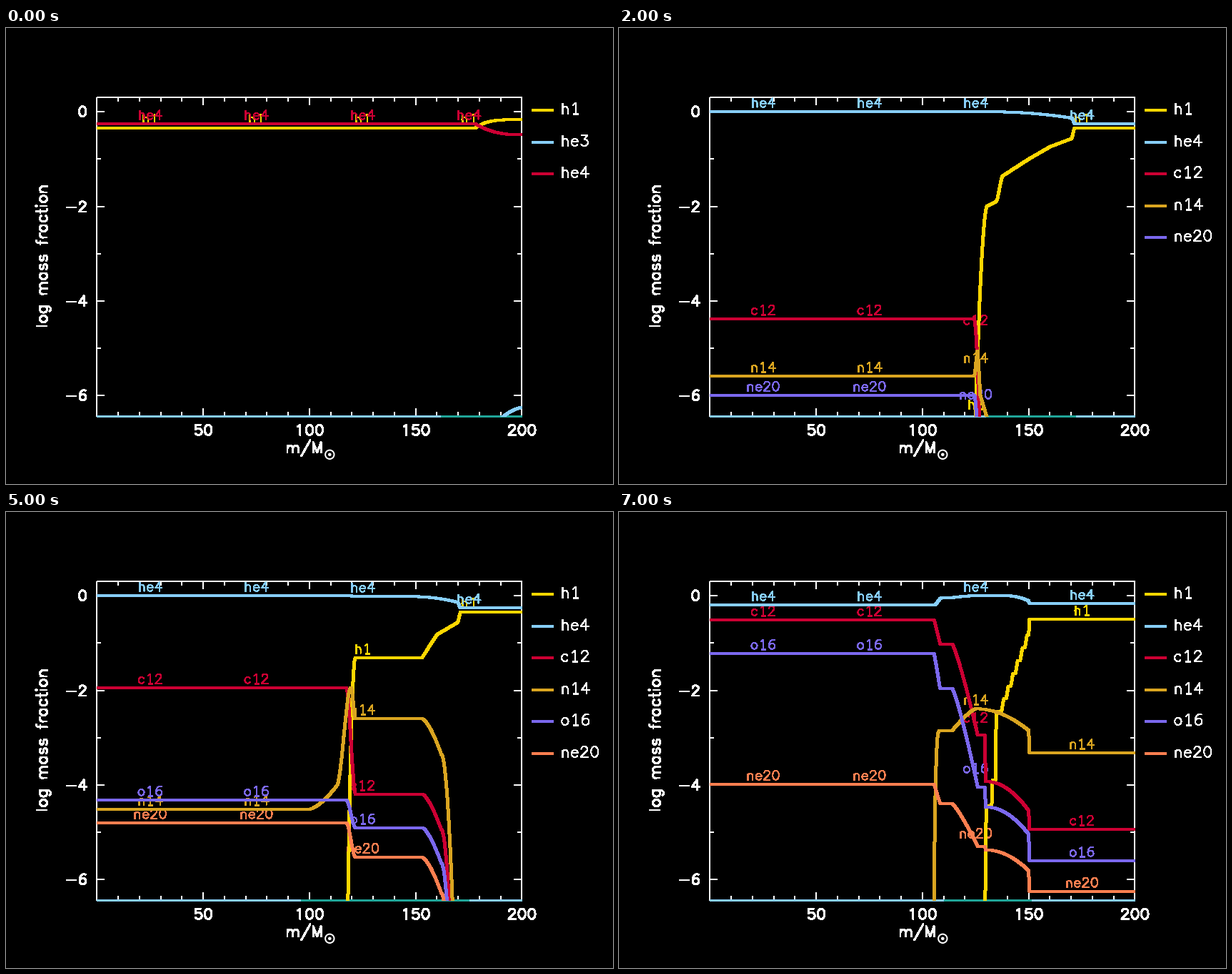
These frames come from a looping animation (850 px wide and 638 px high, 8 s). A matplotlib script:

```python
import numpy as np
import matplotlib.pyplot as plt
from matplotlib.animation import ArtistAnimation
from matplotlib.collections import LineCollection
from matplotlib.patches import Circle, Rectangle

W, H, DPI = 850, 638, 100
PX = 72 / DPI  # points per pixel
LEFT, RIGHT, TOP, BOTTOM = 127.5, 722.5, 97, 543
FLOOR, OUT = -6.44, -7  # lowest log shown, and a level safely below it
STEPS = 8
NAMES = ["h1", "he3", "he4", "c12", "n14", "o16", "ne20"]
COLORS = ["#ffd700", "#87cefa", "#cc0033", "#daa520", "#7b68ee", "#ff7f50"]
TEAL = "#20a598"

fig = plt.figure(figsize=(W / DPI, H / DPI), dpi=DPI, facecolor="black")
ax = fig.add_axes([0, 0, 1, 1])
ax.set_xlim(0, W)
ax.set_ylim(H, 0)
ax.axis("off")
box = Rectangle((127, 97), 596, 447, transform=ax.transData)


def x_of(mass):
    return LEFT + mass * (RIGHT - LEFT) / 200


def y_of(log):
    return np.round(117.3 - 66.1 * log)


# ---- single-stroke lettering: 21 units cap height, baseline at 0 ----
GLYPHS = {}


def glyph(char, advance, *strokes):
    GLYPHS[char] = advance, [np.array(s, float) for s in strokes]


def arc(cx, cy, rx, ry, a0=0, a1=360):
    a = np.radians(np.linspace(a0, a1, 20))
    return list(zip(cx + rx * np.cos(a), cy + ry * np.sin(a)))


bowl = arc(9.5, 7, 6.5, 7, 40, 320)
hump = arc(9.5, 8.5, 5.5, 5.5, 180, 0) + [(15, 0)]
stem, short_stem = [(4, 21), (4, 0)], [(4, 14), (4, 0)]
right_stem, crossbar = [(15, 14), (15, 0)], [(2, 14), (9, 14)]
one = [(6, 17), (11, 21), (11, 0)]

glyph(" ", 16)
glyph("0", 20, arc(10, 10.5, 7, 10.5))
glyph("1", 20, one)
glyph("I", 20, one, [(6, 0), (16, 0)])  # figure one with a foot
glyph("2", 20, arc(10, 15.5, 6, 5.5, 180, -30) + [(3, 0), (17, 0)])
glyph("3", 20, [(5, 21), (16, 21), (10, 13)] + arc(10, 6.5, 7, 6.5, 90, -150))
glyph("4", 20, [(13, 0), (13, 21), (3, 7), (18, 7)])
glyph("5", 20, [(15, 21), (5, 21), (4, 12)] + arc(10, 6.7, 7, 6.7, 125, -150))
glyph("6", 20, arc(13, 9, 9, 12, 70, 180), arc(10.5, 6.5, 6.5, 6.5))
glyph("-", 26, [(4, 9), (22, 9)])
glyph("/", 22, [(20, 25), (2, -7)])
glyph("M", 24, [(4, 0), (4, 21), (12, 0), (20, 21), (20, 0)])
glyph("a", 19, bowl, right_stem)
glyph("c", 18, bowl)
glyph("e", 18, [(3, 8), (15.5, 8)] + arc(9.5, 7, 6.5, 7, 8, 320))
glyph("f", 12, [(5, 0)] + arc(9.5, 16.5, 4.5, 4.5, 180, 80), crossbar)
glyph("g", 19, bowl, right_stem[:1] + arc(9.5, -1, 5.5, 6, 0, -140))
glyph("h", 19, stem, hump)
glyph("i", 8, short_stem, arc(4, 21, 1, 1))
glyph("l", 8, stem)
glyph("m", 30, short_stem, hump, [(x + 11, y) for x, y in hump])
glyph("n", 19, short_stem, hump)
glyph("o", 19, arc(9.5, 7, 6.5, 7))
glyph("r", 13, short_stem, arc(10, 8, 6, 6, 180, 70))
glyph("s", 17, arc(8.5, 10.6, 5, 3.5, 30, 260) + arc(8.5, 3.5, 5.5, 3.6, 80, -150))
glyph("t", 12, [(5, 21)] + arc(8.5, 4, 3.5, 4, 180, 290), crossbar)


def text(x, y, s, size, color="white", width=2.0, align=0, upright=False):
    """Draw s with its baseline at y; align is 0 left, 0.5 centre, 1 right."""
    pen = -align * sum(GLYPHS[c][0] for c in s)
    lines = []
    for c in s:
        advance, strokes = GLYPHS[c]
        for part in strokes:
            u, v = (part[:, 0] + pen) * size, part[:, 1] * size
            lines.append(np.column_stack((x - v, y - u) if upright else (x + u, y - v)))
        pen += advance
    art = LineCollection(lines, colors=color, linewidths=width * PX, antialiaseds=False,
                         capstyle="round", joinstyle="round", zorder=2)
    return ax.add_collection(art, autolim=False)


def name_text(x, y, name, size, color, align=0):
    return text(x, y, name.replace("1", "I"), size, color, 1.1, align)


def stroke(xs, ys, color, width, z=3):
    line, = ax.plot(xs, ys, color=color, lw=width * PX, zorder=z, antialiased=False,
                    solid_capstyle="butt", solid_joinstyle="round")
    return line


def draw_axes():
    def white(xs, ys):
        stroke(xs, ys, "white", 2, 1)

    white([LEFT, RIGHT, RIGHT, LEFT, LEFT], [TOP, TOP, BOTTOM, BOTTOM, TOP])
    for mass in range(10, 200, 10):
        x, size = x_of(mass), 11 if mass % 50 == 0 else 6
        white([x, x], [BOTTOM, BOTTOM - size])
        white([x, x], [TOP, TOP + size])
    for log in range(0, -7, -1):
        y, size = y_of(log), 11 if log % 2 == 0 else 6
        white([LEFT, LEFT + size], [y, y])
        white([RIGHT, RIGHT - size], [y, y])
    for mass in (50, 100, 150, 200):
        text(x_of(mass), 569.5, str(mass), 0.69, align=0.5)
    for log in (0, -2, -4, -6):
        text(114, y_of(log) + 7, str(log), 0.68, align=1)
    text(391.5, 594, "m/M", 0.69)
    text(57.5, 419.5, "log mass fraction", 0.714, upright=True)
    ax.add_patch(Circle((453.3, 596.8), 6.2, fill=False, ec="white", lw=2 * PX))
    ax.add_patch(Circle((453.3, 596.8), 2.3, color="white", lw=0))


# ---- abundance profiles: log fraction over mass ----
MASS = np.linspace(0, 200, 1801)
profiles = [{} for _ in range(STEPS)]


def ease(u, power):
    """0 is smooth; above 0 starts slowly; below 0 ends slowly."""
    if power == 0:
        return u * u * (3 - 2 * u)
    return u ** power if power > 0 else 1 - (1 - u) ** -power


def curve(step, name, level, *moves):
    """Begin at level, then follow moves of (from mass, to mass, new level, power)."""
    log = np.full(MASS.shape, float(level))
    for a, b, new, power in moves:
        log += (new - level) * ease(np.clip((MASS - a) / (b - a), 0, 1), power)
        level = new
    profiles[step][name] = log


def jump(mass, level):
    return mass, mass + 0.3, level, 1


def he_outer(start, edge=171, inner=-0.13, outer=-0.255):
    return [(start, edge - 1, inner, 2), (edge - 0.7, edge + 0.8, outer, 0)]


def h_outer(edge=171):
    return [(150, 160, -0.74, 1), (160, edge - 1, -0.57, 1), (edge - 1, edge + 0.8, -0.336, 0)]


def slope_off(start, level):
    return [(start, start + 9, level - 0.75, 1.5), (start + 9, start + 15, level - 4.75, 2)]


def stairs_off(level, end):
    return [(152, 158, level - 0.5, 1.5), jump(160.5, level - 0.8),
            jump(163.7, level - 1.2), jump(168.1, end)]


# hydrogen burning
curve(0, "h1", -0.342, (178, 200, -0.165, -4))
curve(0, "he3", -6.5, (190, 202, -6.25, -2))
curve(0, "he4", -0.253, (178, 200, -0.487, -2.5))

curve(1, "h1", -1.47, (138, 150, -1.0, 1), *h_outer())
curve(1, "he4", -0.018, *he_outer(138))

# helium core with a bare edge
curve(2, "h1", -6.6, (124.85, 130.4, -2, -1.8), (130.4, 134.5, -1.9, 1),
      (134.5, 138, -1.35, 0), (138, 150, -1.0, 1), *h_outer())
curve(2, "he4", 0, *he_outer(133))
curve(2, "c12", -4.38, (124.2, 127, OUT, 2))
curve(2, "n14", -5.59, (124.3, 126, -5.06, 0), (126, 127.2, -6, 1), (127.2, 130.5, -6.5, 1))
curve(2, "ne20", -6, (124.3, 126, OUT, 2))

# a mixed shell opens above the core
curve(3, "h1", OUT, (126.2, 127.6, -1.415, -2), jump(148.4, -1.04), *h_outer())
curve(3, "he4", 0, *he_outer(142))
curve(3, "n14", -5.93, (122, 124.5, -5.75, 0), (124.5, 127.2, -2.65, 1.3),
      (127.2, 127.8, -3.43, 1), jump(148.3, OUT))
for name, core, shell in (("c12", -1.95, -4.57), ("o16", -4.325, -5.84), ("ne20", -4.825, -6.365)):
    curve(3, name, core, (126.2, 127.7, shell, 0), jump(148.3, OUT))

# the shell widens and its outer edge softens
curve(4, "h1", OUT, (123.8, 126.5, -1.36, -2), *h_outer())
curve(4, "he4", -0.005, *he_outer(145))
curve(4, "n14", -5.05, (112, 119, -4.4, 2), (118, 124.7, -2.05, 0), (125, 126.5, -2.94, 0),
      *slope_off(150.5, -2.94))
for name, core, shell in (("c12", -1.95, -4.33), ("o16", -4.325, -5.25), ("ne20", -4.81, -5.86)):
    curve(4, name, core, (123.3, 126.6, shell, 0), *slope_off(150.5, shell))

curve(5, "h1", OUT, (117.9, 121.6, -1.31, -2), (153, 160, -0.82, 1), *h_outer(170.5)[1:])
curve(5, "he4", 0, (119, 122, -0.015, 0), *he_outer(148, 170.3))
curve(5, "n14", -4.515, (100, 114, -3.95, 1.5), (113, 119.4, -1.95, 0),
      (119.6, 121.6, -2.6, 0), *slope_off(153, -2.6))
for name, core, shell in (("c12", -1.95, -4.195), ("o16", -4.325, -4.905), ("ne20", -4.805, -5.535)):
    curve(5, name, core, (117.3, 121.7, shell, 0), *slope_off(153, shell))

# helium ignites: a second edge in the core, steps outside
curve(6, "h1", OUT, (118.2, 121.8, -1.36, -2), (151, 158, -0.82, 1.3), jump(160.5, -0.72),
      jump(163.7, -0.62), jump(168.1, -0.36))
curve(6, "he4", 0, (119, 122, -0.015, 0), (150, 167, -0.13, 1.3), jump(168.1, -0.24))
curve(6, "n14", OUT, (97.5, 104, -4.4, -4), (104, 113, -4.05, 1), (112.5, 119.3, -2.02, 0),
      (120, 121.8, -2.59, 0), *stairs_off(-2.59, -5.3))
for name, core, mid, shell in (("c12", -1.75, -1.95, -4.195), ("o16", -3.93, -4.325, -4.855),
                               ("ne20", -4.235, -4.825, -5.52)):
    curve(6, name, core, (97, 103, mid, 0), (117.3, 121.8, shell, 0), *stairs_off(shell, OUT))

# helium burning
h_stairs = [(137 + 2.2 * i, 138.4 + 2.2 * i, -2.18 + 0.27 * i, 0) for i in range(6)]
curve(7, "h1", OUT, (129.4, 130, -4.45, 1), jump(132.6, -3.9), jump(134.4, -2.45),
      *h_stairs, jump(150, -0.495))
curve(7, "he4", -0.19, (105.5, 109, -0.045, 0), (110, 124, 0, 0), (140, 150, -0.11, 2),
      jump(150, -0.16))
curve(7, "n14", OUT, (105.3, 108.4, -2.855, -4), (114, 125, -2.39, -1.3),
      (125, 150, -2.85, 2), jump(150, -3.33))
for name, core, *levels in (("c12", -0.51, -1.02, -2.95, -3.93, -4.55, -4.94),
                            ("o16", -1.22, -1.96, -4.05, -4.47, -5.05, -5.61),
                            ("ne20", -3.99, -4.4, -5.3, -5.38, -5.82, -6.26)):
    ledge, slope, drop, sag, outer = levels
    curve(7, name, core, (105.5, 108.3, ledge, 1), (114, 126, slope, 1.2),
          jump(129.4, drop), (130, 150, sag, 2), jump(150, outer))

# stretch of the floor line shown in teal, by mass
teal_spans = [(162, 200), (150, 174), (130, 172), (130, 175),
              (108, 175), (96, 175), (103, 169), (110, 151)]


def draw_step(step):
    floor_y = [BOTTOM - 0.5] * 2
    arts = [stroke([LEFT, RIGHT], floor_y, COLORS[1], 3),
            stroke([x_of(m) for m in teal_spans[step]], floor_y, TEAL, 3)]
    shown = [n for n in NAMES if n in profiles[step]]
    for i, name in enumerate(shown):
        log, color, y = profiles[step][name], COLORS[i], round(115 + 44.6 * i)
        line = stroke(x_of(MASS), y_of(log), color, 4)
        line.set_clip_path(box)
        arts += [line, stroke([736, 767], [y, y], color, 4),
                 name_text(776, y + 5, name, 0.72, "white")]
        for mass in (25, 75, 125, 175):
            level = np.interp(mass, MASS, log)
            if level > FLOOR:
                arts.append(name_text(x_of(mass), y_of(level) - 6.3, name, 0.62, color, 0.5))
    return arts


draw_axes()
anim = ArtistAnimation(fig, [draw_step(i) for i in range(STEPS)],
                       interval=1000, repeat=True, repeat_delay=0)
plt.show()
```
